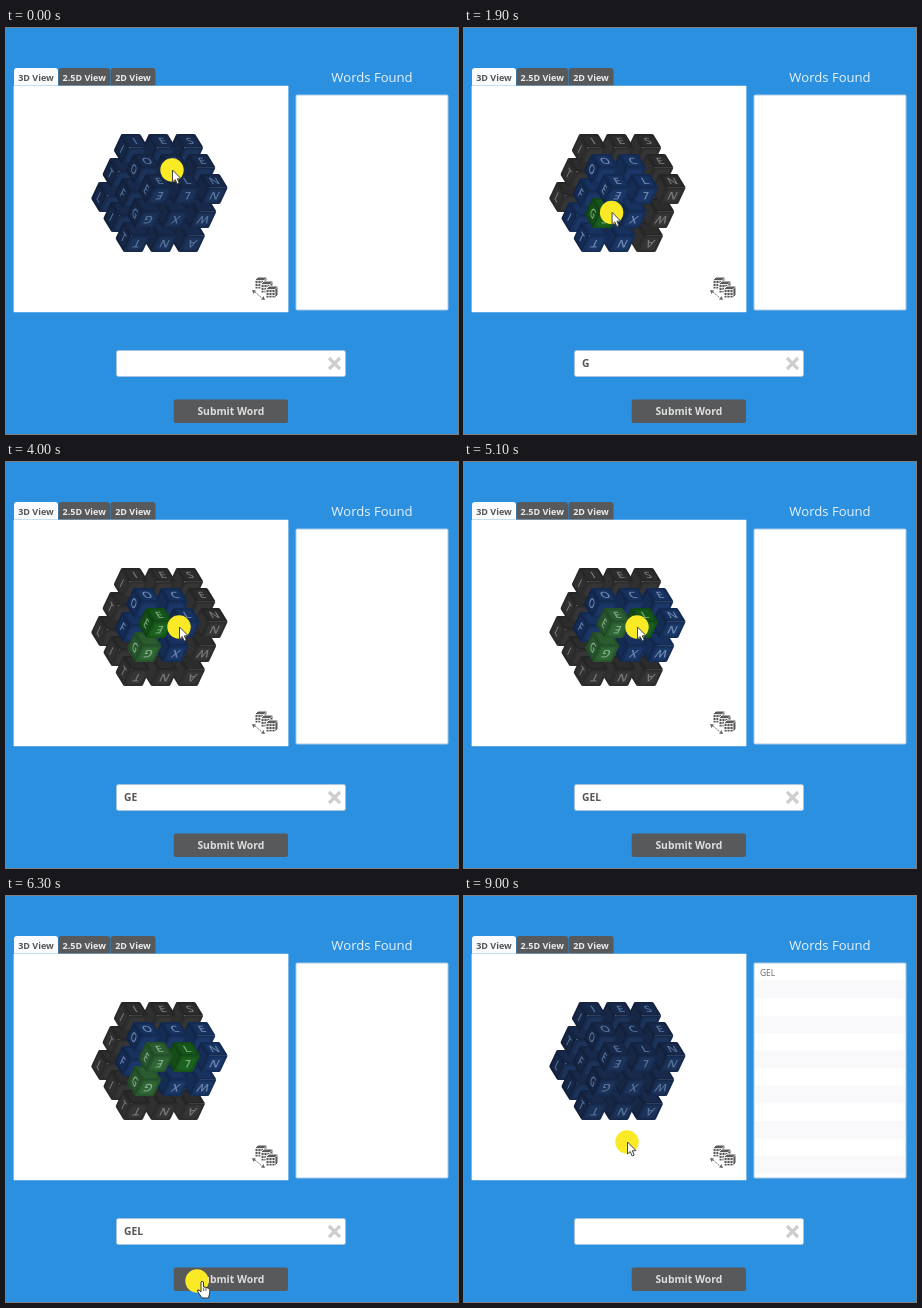
An HTML page with a canvas for the animation above (9.1 s loop, 452 px wide and 406 px high).

```html
<!DOCTYPE html>
<html lang="en">
<head>
<meta charset="utf-8">
<title>Word cube</title>
<style>
html, body { margin: 0; width: 100%; height: 100%; overflow: hidden; background: #2b90df; }
canvas { display: block; }
</style>
</head>
<body>
<canvas id="stage" width="452" height="406"></canvas>
<script>
const ctx = document.getElementById('stage').getContext('2d');
const LOOP = 9100, SUBMIT = 6700, RESET = 8000;
const FONT = '"Open Sans", "Noto Sans", sans-serif';

// Screen steps between neighbouring cubes: right, towards the viewer, down
const I = [27.5, 0], J = [12.2, 20], K = [-11.3, 24];
const ORIGIN = [125, 121], SIZE = 0.67;
const LETTERS = 'IESOCEELN' + 'TRSFAOGXW' + 'LIEIRSTNA';
const PICKS = [
  { at: 1500, pos: [0, 2, 1] },
  { at: 2900, pos: [0, 2, 0] },
  { at: 4300, pos: [1, 2, 0] }
];
// top, front, left, letter
const COLORS = {
  idle: ['#182a4c', '#1b3259', '#162645', '#56739c'],
  near: ['#17325f', '#1a3767', '#152c54', '#6d88b0'],
  far: ['#2c2c2d', '#353536', '#303031', '#797979'],
  last: ['#17561a', '#1c621f', '#154d18', '#79ab79'],
  used: ['#2a5c2f', '#2f6635', '#28552d', '#86ac89']
};
// time, x, y of the pointer
const PATH = [
  [0, 166, 142], [100, 166, 142], [900, 147, 190], [1700, 147, 190],
  [2400, 150, 162], [3400, 150, 162], [3800, 173, 165], [5100, 173, 165],
  [5900, 191, 385], [8700, 191, 385], [9000, 163, 246], [LOOP, 163, 246]
];

function box(x, y, w, h, r, fill, stroke) {
  ctx.beginPath();
  ctx.roundRect(x, y, w, h, r);
  ctx.fillStyle = fill;
  ctx.fill();
  if (stroke) {
    ctx.strokeStyle = stroke;
    ctx.lineWidth = 1;
    ctx.stroke();
  }
}

function text(str, x, y, size, color, weight = 400, align = 'left') {
  ctx.font = `${weight} ${size}px ${FONT}`;
  ctx.textAlign = align;
  ctx.textBaseline = 'alphabetic';
  ctx.fillStyle = color;
  ctx.fillText(str, x, y);
}

function poly(points, fill, stroke) {
  ctx.beginPath();
  points.forEach(p => ctx.lineTo(...p));
  ctx.closePath();
  ctx.fillStyle = fill;
  ctx.fill();
  if (stroke) {
    ctx.strokeStyle = stroke;
    ctx.lineWidth = 1;
    ctx.lineJoin = 'round';
    ctx.stroke();
  }
}

const place = (i, j, k) =>
  [0, 1].map(n => ORIGIN[n] + i * I[n] + j * J[n] + k * K[n]);

// One cube side, drawn in a 20 x 20 space spanned by u and v
function face(center, out, sign, u, v, flip, color, ink, letter) {
  const s = SIZE / 20 * flip, o = SIZE / 2 * sign;
  ctx.save();
  ctx.transform(u[0] * s, u[1] * s, v[0] * s, v[1] * s,
    center[0] + out[0] * o, center[1] + out[1] * o);
  box(-10.3, -10.3, 20.6, 20.6, 1.5, color);
  box(-10.3, -10.3, 20.6, 20.6, 1.5, 'rgba(0,0,0,.14)');
  box(-7.8, -7.8, 15.6, 15.6, 3, color);
  text(letter, 0, 4.8, 13, ink, 600, 'center');
  ctx.restore();
}

function cubeState(pos, picked) {
  if (!picked.length) return 'idle';
  const same = p => p.pos.every((c, n) => c === pos[n]);
  const last = picked[picked.length - 1];
  if (same(last)) return 'last';
  if (picked.some(same)) return 'used';
  return last.pos.every((c, n) => Math.abs(c - pos[n]) < 2) ? 'near' : 'far';
}

function drawCubes(picked) {
  const core = [[0, 0, 0], [2, 0, 0], [2, 2, 0], [2, 2, 2], [0, 2, 2], [0, 0, 2]];
  poly(core.map(p => place(...p)), picked.length ? '#1d2025' : '#12203c');
  for (let i = 2; i >= 0; i--)
    for (let j = 0; j < 3; j++)
      for (let k = 2; k >= 0; k--) {
        const [top, front, left, ink] = COLORS[cubeState([i, j, k], picked)];
        const c = place(i, j, k), letter = LETTERS[k * 9 + j * 3 + i];
        // only the outer sides carry readable letters
        face(c, I, -1, J, K, 1, left, ink, i ? '' : letter);
        face(c, K, -1, I, J, 1, top, ink, k ? '' : letter);
        face(c, J, 1, I, K, -1, front, ink, j < 2 ? '' : letter);
      }
}

function drawIcon() {
  for (const [x, y] of [[249, 249], [255, 253], [260, 258]]) {
    poly([[x, y + 3], [x + 3, y], [x + 12, y], [x + 12, y + 9], [x + 9, y + 12], [x, y + 12]],
      '#5a5a5a', '#fff');
    ctx.beginPath();
    for (const d of [3, 6, 9]) {
      ctx.moveTo(x + d, y + 3.5); ctx.lineTo(x + d, y + 12);
      ctx.moveTo(x, y + d + 0.5); ctx.lineTo(x + 9, y + d + 0.5);
    }
    ctx.moveTo(x + 9, y + 3.5); ctx.lineTo(x + 12, y + 0.5);
    ctx.lineWidth = 0.8;
    ctx.stroke();
  }
  poly([[246, 262], [250, 262.5], [247.5, 266]], '#666');
  poly([[259, 272], [255, 271.5], [257.5, 268]], '#666');
  ctx.strokeStyle = '#777';
  ctx.lineWidth = 1;
  ctx.setLineDash([2, 1]);
  ctx.beginPath();
  ctx.moveTo(249, 264); ctx.lineTo(256, 270);
  ctx.stroke();
  ctx.setLineDash([]);
}

function drawTab(label, x, w, active) {
  box(x, 40, w, 18, [3, 3, 0, 0], active ? '#fafbfd' : '#58595b');
  text(label, x + w / 2, 52.5, 9, active ? '#555' : '#ececec', 700, 'center');
}

function drawList(found) {
  box(290, 67, 152, 215, 1, '#fff', '#a9c9e8');
  if (!found) return;
  for (let n = 1; n < 12; n += 2) box(291, 67 + n * 17.55, 150, 17.5, 0, '#f9f8fb');
  text('GEL', 296, 79.5, 8.4, '#666');
}

function drawForm(word, ok) {
  box(110.5, 322.5, 229, 26, 2, ok ? '#4c9b51' : '#fff', ok ? '#4c9b51' : '#a5c3e0');
  text(word, 118, 339, 10.3, ok ? '#eef3ee' : '#555', 700);
  ctx.strokeStyle = ok ? '#cbd8ca' : '#cdced0';
  ctx.lineWidth = 3.2;
  ctx.beginPath();
  ctx.moveTo(323, 330); ctx.lineTo(334, 341);
  ctx.moveTo(334, 330); ctx.lineTo(323, 341);
  ctx.stroke();
  box(167.7, 371.5, 114.3, 23.5, 2, ok ? '#4c9b51' : '#58595b');
  text('Submit Word', 224.8, 387, 10.35, ok ? '#edf3ec' : '#dedede', 700, 'center');
}

function pointerAt(t) {
  const n = PATH.findIndex(p => p[0] > t);
  const [t0, x0, y0] = PATH[n - 1], [t1, x1, y1] = PATH[n];
  const f = (t - t0) / (t1 - t0), e = f * f * (3 - 2 * f);
  return [x0 + (x1 - x0) * e, y0 + (y1 - y0) * e];
}

function drawPointer(x, y) {
  box(x - 11.7, y - 11.7, 23.4, 23.4, 11.7, '#f9ea25');
  ctx.save();
  ctx.translate(x, y);
  if (x > 168 && x < 282 && y > 371 && y < 395) {
    poly([[4, 1], [5, 0], [6.5, 1], [6.5, 6], [9, 6.3], [12, 7.5], [13, 9], [12.5, 13],
      [11.5, 17], [5, 17], [1, 11], [0.5, 9], [2, 9], [4, 11]], '#fff', '#333');
    ctx.beginPath();
    for (const d of [6.7, 9]) { ctx.moveTo(d, 7); ctx.lineTo(d, 10); }
    ctx.lineWidth = 0.8;
    ctx.stroke();
  } else {
    poly([[0.5, 0], [0.5, 12], [3.2, 9.5], [5.2, 14], [7.2, 13.1], [5.3, 8.8], [9, 8.6]],
      '#fff', '#444');
  }
  ctx.restore();
}

function draw(now) {
  const t = now % LOOP;
  const picked = t < RESET ? PICKS.filter(p => t >= p.at) : [];
  box(0, 0, 452, 406, 0, '#2b90df');
  drawTab('3D View', 8, 44, true);
  drawTab('2.5D View', 52.5, 51.5);
  drawTab('2D View', 104.5, 45);
  text('Words Found', 366, 54, 13.1, '#e6f2fc', 400, 'center');
  box(7.8, 58, 274.4, 226, 0, '#fff', '#8cc0ec');
  box(8, 58, 274, 226, 0, '#fff');
  drawCubes(picked);
  drawIcon();
  drawList(t >= SUBMIT);
  drawForm('GEL'.slice(0, picked.length), t >= SUBMIT && t < RESET);
  drawPointer(...pointerAt(t));
}

const start = performance.now();
function tick() {
  draw(performance.now() - start);
  requestAnimationFrame(tick);
}
tick();
</script>
</body>
</html>
```
